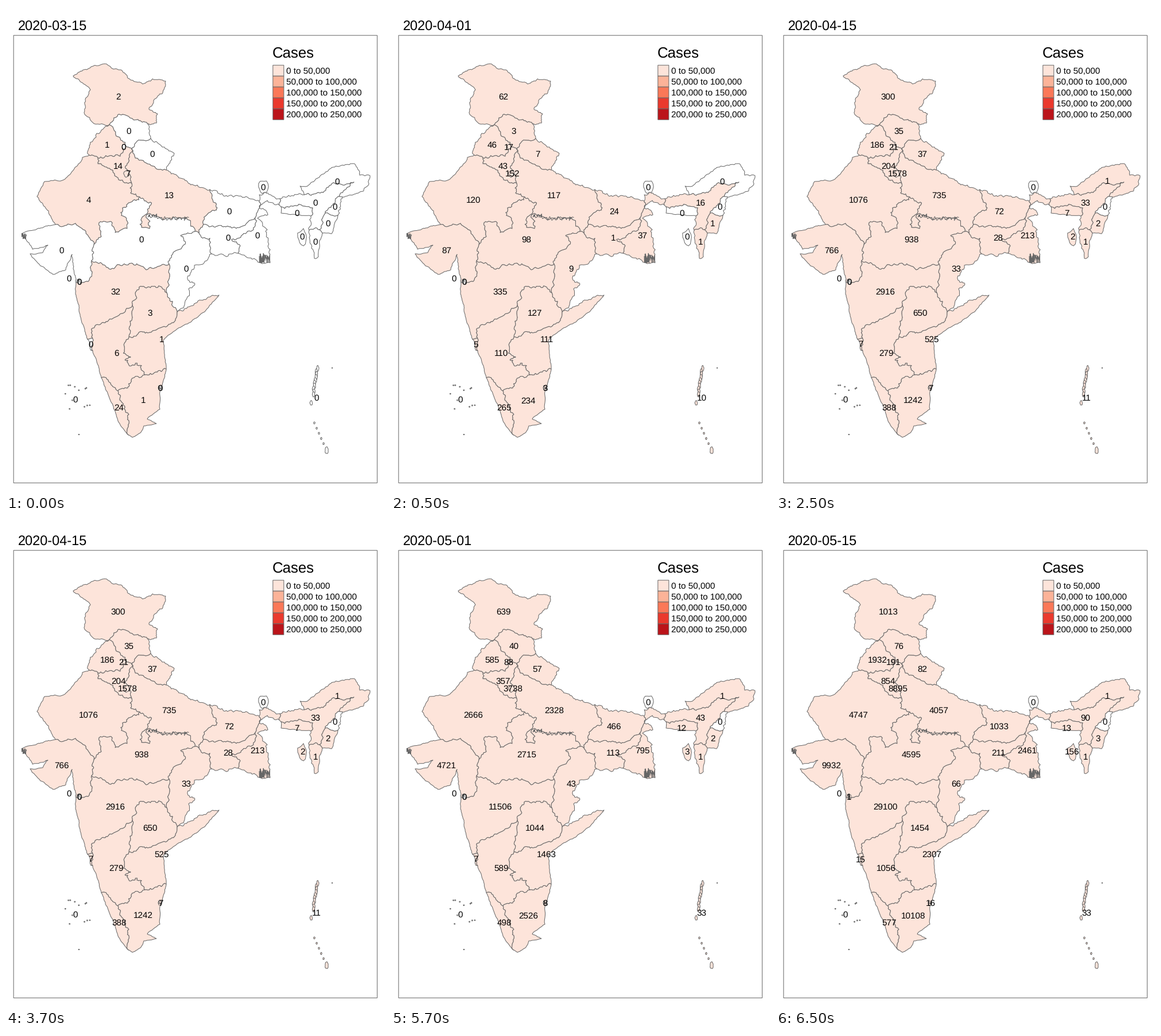
A matplotlib script for the animation above (8 s loop, 660 by 849 pixels).

```python
import random

import matplotlib.pyplot as plt
import numpy as np
from matplotlib.animation import FuncAnimation
from matplotlib.patches import Polygon, Rectangle

W, H, DPI = 660, 849, 96
PX = 72 / DPI
LINE = "#666666"
REDS = ["#fde4da", "#fcb398", "#fb7858", "#ea392d", "#bb141a"]
DATES = [f"2020-{month:02}-{day:02}" for month, day in
         [(3, 15), (4, 1), (4, 15), (5, 1), (5, 15)]]
COAST = 0.1
NEVER = (0,) * 5

plt.rcParams.update({"font.family": "Liberation Sans", "text.hinting": "no_hinting"})
fig = plt.figure(figsize=(W / DPI, H / DPI), dpi=DPI, facecolor="white")
ax = fig.add_axes([0, 0, 1, 1])
ax.set(xlim=(0, W), ylim=(H, 0))
ax.axis("off")

arcs = {}
states = []


def text(x, y, content, size=15.3, ha="left"):
    return ax.text(x, y, content, fontsize=size * PX, ha=ha, va="baseline", zorder=5)


def ragged(p, q, rough, rng):
    """Split a line again and again, pushing each midpoint aside."""
    length = abs(q - p)
    if length < 4:
        return [p]
    push = min(length, 9) * rng.uniform(-rough, rough)
    mid = (p + q) / 2 + 1j * (q - p) / length * push
    return ragged(p, mid, rough, rng) + ragged(mid, q, rough, rng)


def arc(name, *xy, rough=0.3):
    """Store a border through a few key points, as complex numbers."""
    keys = [complex(x, y) for x, y in zip(xy[::2], xy[1::2])]
    rng = random.Random(name)
    line = [z for p, q in zip(keys, keys[1:]) for z in ragged(p, q, rough, rng)]
    arcs[name] = line + keys[-1:]


def ring(names):
    """Chain arcs into one outline, turning each one to fit the last."""
    first, second, *rest = [arcs[n] for n in names.split()]
    ends = (second[0], second[-1])
    line = first if first[-1] in ends else first[::-1]
    for part in [second, *rest]:
        line = line + (part if part[0] == line[-1] else part[::-1])
    return np.column_stack([np.real(line), np.imag(line)])


def blob(x, y, w, h):
    rng = np.random.default_rng(int(x * 1000 + y))
    turn = np.linspace(0, 2 * np.pi, 14, endpoint=False)
    size = rng.uniform(0.8, 1.15, turn.size)
    return np.column_stack([x + w * size * np.cos(turn), y + h * size * np.sin(turn)])


def scribble(x, y, w, h, n):
    rng = np.random.default_rng(n)
    ax.plot(np.sort(rng.uniform(x, x + w, n)), rng.uniform(y, y + h, n),
            color=LINE, lw=PX, zorder=3)


def state(x, y, counts, *outlines):
    patches = [ax.add_patch(Polygon(ring(o) if isinstance(o, str) else o,
                                    ec=LINE, lw=PX, joinstyle="round", zorder=2))
               for o in outlines]
    states.append((counts, patches, text(x, y + 5.5, "", ha="center")))


# North
arc("jk_out", 180, 207, 153, 205, 136, 186, 138, 163, 147, 146, 131, 133, 117, 122,
    148, 106, 175, 101, 187, 110, 203, 114, 215, 127, 238, 136, 255, 127, 278, 131,
    272, 153, 258, 163, 249, 180, 264, 188, 262, 204, 246, 205, rough=.2)
arc("jk_hp", 180, 207, 188, 195, 203, 189, 230, 198, 246, 205)
arc("hp_out", 246, 205, 252, 231)
arc("hp_uk", 252, 231, 228, 236, 221, 252)
arc("hp_hr", 221, 252, 208, 243)
arc("hp_pb", 208, 243, 195, 228, 180, 207)
arc("uk_out", 252, 231, 276, 246, 293, 257, 279, 286)
arc("uk_up", 221, 252, 225, 265, 255, 279, 279, 286)
arc("pb_out", 180, 207, 158, 222, 145, 244, 145, 260)
arc("pb_rj", 145, 260, 160, 265)
arc("pb_hr", 160, 265, 199, 262, 208, 243)
arc("hr_rj", 160, 265, 160, 275, 180, 283, 196, 303, 219, 309)
arc("hr_up", 221, 252, 211, 275, 219, 309)
arc("rj_out", 145, 260, 133, 264, 128, 274, 98, 304, 67, 306, 54, 332, 74, 357,
    86, 381, rough=.15)
arc("rj_gj", 86, 381, 121, 379, 139, 393, 153, 416)
arc("rj_mp", 153, 416, 166, 402, 162, 378, 173, 376, 185, 378, 190, 395, 211, 388,
    211, 375, 200, 360, 203, 352, 233, 333)
arc("rj_up", 233, 333, 217, 326, 219, 309)
arc("up_mp", 233, 333, 251, 342, 240, 366, 236, 386, 250, 388, 247, 363, 285, 371,
    318, 373, 329, 393, rough=.4)
arc("up_cg", 329, 393, 337, 398)
arc("up_jh", 337, 398, 344, 381)
arc("up_br", 344, 381, 345, 368, 368, 352, 355, 320)
arc("up_out", 355, 320, 326, 312, 298, 296, 279, 286)

# Centre and east
arc("mp_cg", 329, 393, 304, 400, 312, 415, 290, 433, 284, 450)
arc("cg_mh", 284, 450, 283, 478, 280, 500)
arc("cg_ts", 280, 500, 290, 515, 298, 534)
arc("cg_or", 298, 534, 311, 521, 318, 493, 328, 487, 317, 478, 328, 452, 343, 450, 358, 432)
arc("cg_jh", 358, 432, 355, 405, 337, 398)
arc("br_out", 355, 320, 388, 331, 420, 333, 441, 340)
arc("br_wb", 441, 340, 434, 369)
arc("br_jh", 434, 369, 409, 385, 344, 381)
arc("jh_wb", 434, 369, 431, 390, 393, 407, 408, 418, 404, 431)
arc("jh_or", 404, 431, 384, 437, 358, 432)
arc("wb_north", 441, 340, 441, 329, 456, 326, 477, 336)
arc("wb_as", 477, 336, 476, 347)
arc("wb_bd", 476, 347, 455, 339, 441, 349, 456, 364, 438, 370, 455, 390, 460, 447)
arc("wb_south", 460, 447, 442, 447, 432, 440, 404, 431)

# West and south
arc("gj_out", 86, 381, 55, 388, 27, 397, 46, 424, 73, 417, 64, 430, 42, 432, 60, 453,
    82, 468, 104, 460, 115, 433, 117, 450, 122, 483, rough=.15)
arc("gj_mh", 122, 483, 140, 480, 150, 463, 149, 444)
arc("gj_mp", 149, 444, 153, 416)
arc("mp_mh", 149, 444, 188, 458, 197, 451, 232, 452, 244, 460, 284, 450)
arc("mh_ts", 280, 500, 271, 490, 232, 490, 220, 522)
arc("mh_ka", 220, 522, 203, 536, 178, 549, 149, 563, 151, 580)
arc("mh_goa", 151, 580, 142, 581)
arc("mh_coast", 142, 581, 128, 535, 121, 500, 122, 483, rough=COAST)
arc("goa_coast", 142, 581, 151, 601)
arc("goa_ka", 151, 580, 151, 601)
arc("ts_ap", 298, 534, 292, 552, 247, 570, 214, 577)
arc("ts_ka", 214, 577, 220, 522)
arc("ap_or", 298, 534, 330, 518, 371, 504)
arc("ap_coast", 371, 504, 350, 528, 322, 551, 298, 563, 274, 583, 279, 633, rough=COAST)
arc("ap_tn", 279, 633, 242, 643)
arc("ap_ka", 242, 643, 236, 627, 207, 617, 217, 612, 206, 600, 214, 577, rough=.45)
arc("ka_coast", 151, 601, 166, 648, rough=COAST)
arc("ka_kl", 166, 648, 195, 671)
arc("ka_tn", 195, 671, 212, 666, 218, 652, 242, 643)
arc("kl_coast", 166, 648, 184, 692, 198, 728, 214, 748, rough=COAST)
arc("kl_tn", 195, 671, 206, 702, 214, 712, 214, 748)
arc("tn_coast", 279, 633, 268, 672, 268, 703, 246, 720, 262, 728, 240, 732, 235, 743,
    220, 752, 214, 748, rough=COAST)

# North-east
arc("as_north", 477, 336, 519, 329)
arc("as_ar", 519, 329, 547, 326, 563, 313, 606, 307, 580, 332)
arc("as_nl", 580, 332, 556, 361)
arc("as_mn", 556, 361, 546, 390)
arc("as_mz", 546, 390, 528, 391)
arc("as_bd", 528, 391, 531, 366)
arc("as_ml", 531, 366, 534, 352, 479, 350)
arc("as_w", 479, 350, 476, 347)
arc("ml_out", 479, 350, 479, 361, 531, 366, rough=COAST)
arc("ar_out", 519, 329, 512, 314, 525, 314, 553, 293, 570, 281, 607, 275, 616, 295,
    634, 296, 632, 310, 622, 323, 586, 333, rough=.2)
arc("ar_nl", 586, 333, 580, 332)
arc("nl_out", 586, 333, 578, 365)
arc("nl_mn", 578, 365, 556, 361)
arc("mn_out", 578, 365, 567, 397, 551, 396, rough=COAST)
arc("mn_mz", 546, 390, 551, 396)
arc("mz_out", 551, 396, 544, 437, 537, 440, 528, 391, rough=.2)

state(195.5, 157, (2, 62, 300, 639, 1013), "jk_out jk_hp")
state(214, 217, (0, 3, 35, 40, 76), "jk_hp hp_out hp_uk hp_hr hp_pb")
state(176.5, 241.5, (1, 46, 186, 585, 1932), "pb_out pb_rj pb_hr hp_pb")
state(195.5, 278.5, (14, 43, 204, 357, 854), "pb_hr hr_rj hr_up hp_hr")
state(255, 257.5, (0, 7, 37, 57, 82), "hp_uk uk_out uk_up")
state(143.5, 337, (4, 120, 1076, 2666, 4747), "rj_out rj_gj rj_mp rj_up hr_rj pb_rj")
state(284, 329.5, (13, 117, 735, 2328, 4057),
      "uk_up up_out up_br up_jh up_cg up_mp rj_up hr_up")
state(388.5, 357.5, (0, 24, 72, 466, 1033), "br_out br_wb br_jh up_br")
state(387, 403, (0, 1, 28, 113, 211), "br_jh jh_wb jh_or cg_jh up_jh")
state(437.5, 399, (0, 37, 213, 795, 2461), "wb_north wb_as wb_bd wb_south jh_wb br_wb")
state(314, 457, (0, 9, 33, 43, 66), "mp_cg cg_mh cg_ts cg_or cg_jh up_cg")
state(236, 406, (0, 98, 938, 2715, 4595), "rj_mp up_mp mp_cg mp_mh gj_mp")
state(96.5, 425, (0, 87, 766, 4721, 9932), "gj_out gj_mh gj_mp rj_gj")
state(190.5, 497.5, (32, 335, 2916, 11506, 29100),
      "mp_mh cg_mh mh_ts mh_ka mh_goa mh_coast gj_mh")
state(251, 534, (3, 127, 650, 1044, 1454), "cg_ts ts_ap ts_ka mh_ts")
state(271, 580.5, (1, 111, 525, 1463, 2307), "ap_or ap_coast ap_tn ap_ka ts_ap")
state(192, 604, (6, 110, 279, 589, 1056),
      "mh_ka goa_ka ka_coast ka_kl ka_tn ap_ka ts_ka")
state(197, 699.5, (24, 265, 388, 498, 577), "kl_coast kl_tn ka_kl")
state(239, 687, (1, 234, 1242, 2526, 10108), "tn_coast kl_tn ka_tn ap_tn")
state(539, 342.5, (0, 16, 33, 43, 90),
      "as_north as_ar as_nl as_mn as_mz as_bd as_ml as_w wb_as")
state(577, 305, (0, 0, 1, 1, 1), "ar_out ar_nl as_ar")
state(572.5, 349, NEVER, "as_nl ar_nl nl_out nl_mn")
state(506.5, 360.5, (0, 0, 7, 12, 13), "as_ml ml_out")
state(560.5, 378.5, (0, 1, 2, 2, 3), "nl_mn mn_out mn_mz as_mn")
state(539, 410.5, (0, 1, 1, 1, 1), "mn_mz mz_out as_mz")
state(147.5, 589, (0, 5, 7, 7, 15), "mh_goa goa_ka goa_coast")

# Small territories and islands
state(448, 315, NEVER, blob(448, 315, 8.5, 12))
state(516, 401, (0, 0, 2, 3, 156), blob(516, 403, 8, 14))
state(205, 245, (0, 17, 21, 88, 191), blob(205.5, 245, 3, 4))
state(212, 291.5, (7, 152, 1578, 3738, 8895), blob(210, 292, 5, 6))
state(109.5, 474, NEVER)
state(127.5, 480, (0, 0, 0, 0, 1), blob(127, 480, 4, 5))
state(269, 665.5, (0, 3, 7, 8, 16), blob(268, 666, 3, 4))

rng = random.Random(4)
atolls = [blob(rng.uniform(100, 150), rng.uniform(656, 706), 0.9, 0.9) for _ in range(12)]
state(120.5, 685, NEVER, blob(127, 747, 0.8, 0.6), *atolls)
chain = [blob(542 - k * 0.8 + rng.uniform(-1, 1), 632 + k * 5, 2, 5) for k in range(10)]
south = [blob(537 + k * 4, 727 + k * 9, 1.3, 1.8) for k in range(5)]
state(541, 682.5, (0, 10, 11, 33, 33), *chain, *south, blob(531.5, 692, 2.2, 4),
      blob(568, 631, 0.6, 0.6), blob(558.5, 775, 2.8, 6))

# Finely broken coast and border
scribble(441, 431, 19, 17, 70)
scribble(27, 396, 9, 10, 40)
scribble(246, 363, 17, 7, 26)
scribble(263, 367, 55, 7, 34)
scribble(124, 476, 7, 8, 12)
scribble(265, 661, 6, 8, 11)

# Frame and legend
ax.add_patch(Rectangle((13.2, 51.2), 633.2, 780.2, fill=False, ec=LINE, lw=PX, snap=False))
text(463.5, 89.5, "Cases", 25.8)
for k, color in enumerate(REDS):
    y = 103.2 + 19 * k
    ax.add_patch(Rectangle((464.8, y), 19, 19, fc=color, ec=LINE, lw=PX, snap=False))
    text(488.5, y + 15.2, f"{k * 50000:,} to {(k + 1) * 50000:,}")
date = text(20.5, 42.5, "", 23.5)


def update(i):
    step = (i + 3) // 4
    date.set_text(DATES[step])
    for counts, patches, label in states:
        count = counts[step]
        label.set_text(str(count))
        for patch in patches:
            patch.set_facecolor(REDS[count // 50000] if count else "white")


animation = FuncAnimation(fig, update, frames=16, interval=500, repeat=True,
                          init_func=lambda: update(0))
plt.show()
```
